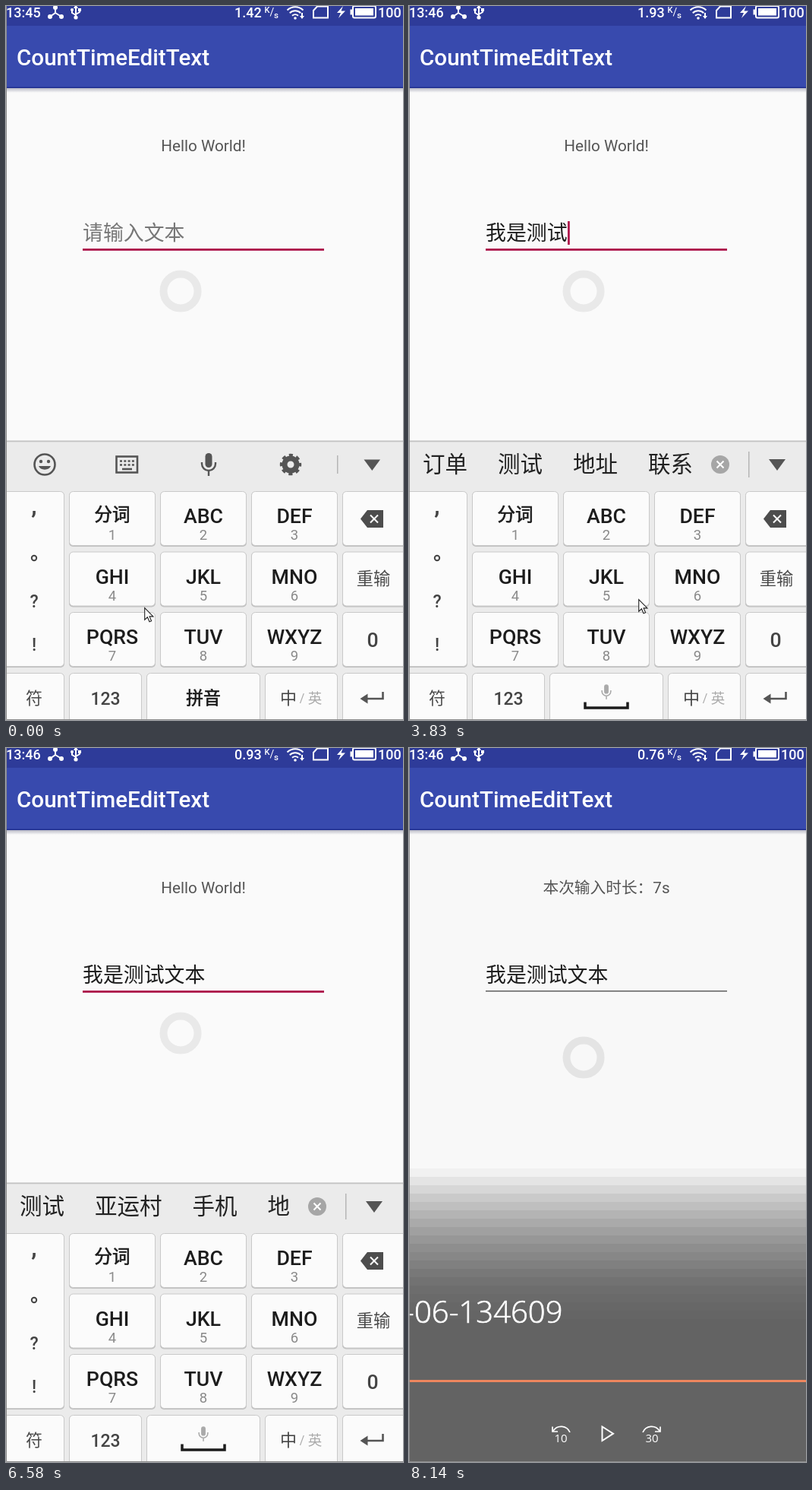
Write an HTML page that moves like this. It is 523x939 px and loops after 8.24 s.

```html
<!DOCTYPE html>
<html lang="zh-CN">
<head>
<meta charset="utf-8">
<title>CountTimeEditText</title>
<style>
html, body { margin: 0; width: 100%; height: 100%; overflow: hidden; background: #fafafa; }
svg { display: block; width: 523px; height: 939px; font-family: Roboto, "Noto Sans CJK SC", sans-serif; }
text { white-space: pre; }
.key { fill: #fbfbfb; stroke: #c9c9c9; stroke-width: 1; }
.shade { fill: #c0c0c0; }
.line { fill: none; stroke: #fff; stroke-width: 2; }
.ink { fill: #555; }
.inkline { fill: none; stroke: #555; stroke-width: 2.6; }
.thick { stroke: currentColor; stroke-width: .7; }
.player { font-family: "Open Sans", sans-serif; fill: #fff; }
</style>
</head>
<body>
<svg viewBox="0 0 523 939" xmlns="http://www.w3.org/2000/svg">
  <defs>
    <linearGradient id="drop" x2="0" y2="1">
      <stop stop-color="#b9bac6"/><stop offset="1" stop-color="#fafafa"/>
    </linearGradient>
    <clipPath id="clip"><rect id="clipBox" y="573" width="374" height="62"/></clipPath>
    <g id="mic">
      <rect x="-4.5" y="-15" width="9" height="19" rx="4.5"/>
      <path d="M-9 -3v2a9 9 0 0 0 18 0v-2M0 8v7" fill="none" stroke="currentColor" stroke-width="2.4"/>
    </g>
  </defs>
  <rect id="page" width="523" height="939" fill="#fafafa"/>

  <g id="app">
    <rect y="108" width="523" height="6" fill="url(#drop)"/>
    <rect width="523" height="26" fill="#2e3b99"/>
    <rect y="26" width="523" height="82" fill="#384aae"/>
    <rect y="106.500" width="523" height="1.500" fill="#1f2f8f"/>
  </g>

  <g id="status" fill="#fff">
    <path class="line" d="M65 2v7l-7 5M65 9l8 5"/>
    <circle cx="65" cy="2" r="3"/><circle cx="58" cy="14" r="3"/><circle cx="73" cy="14" r="3"/>
    <path class="line" d="M92 1v14M87 5v4l5 3M97 4v4l-5 3" stroke-width="1.7"/>
    <path d="M92 -2l3 5h-6z"/><circle cx="92" cy="15" r="2.6"/><circle cx="87" cy="5" r="2"/><rect x="95" y="3" width="4" height="4"/>
    <path class="line" d="M370.500 5.500a15 15 0 0 1 21 0M373.800 9.200a10.300 10.300 0 0 1 14.400 0M377 12.700a6 6 0 0 1 8 0"/>
    <circle cx="381" cy="16" r="1.8"/>
    <path id="arrow"/>
    <path class="line" d="M405 15.500V6l5 -5.500H424V15.500z" stroke-width="2.2"/>
    <path d="M444 0l-8 9h5l-3 7l9 -9.500h-5.500z"/>
    <rect class="line" x="457" y="0" width="30" height="15.500" rx="2"/>
    <rect x="460" y="3" width="24" height="9.500"/><rect x="453.500" y="4.500" width="3" height="7"/>
  </g>

  <g id="edit">
    <rect id="rule" x="101" y="319" width="318"/>
    <rect id="caret" y="283" width="2.800" height="31" fill="#b0104c"/>
    <circle id="ring" cx="230" r="22.500" fill="none" stroke="#e8e8e8" stroke-width="10"/>
  </g>

  <g id="board">
    <g id="tab">
      <path id="tabBox" fill="#fafafa" stroke="#b9b9b9"/>
      <text id="pin" x="5" y="566" font-size="22.500" fill="#222"></text>
    </g>
    <rect y="572" width="523" height="367" fill="#ebebeb"/>
    <rect y="571.500" width="523" height="1.800" fill="#c2c2c2"/>
    <g id="tools">
      <circle class="inkline" cx="51" cy="603" r="13.500"/>
      <g class="ink">
        <circle cx="46" cy="599" r="2.200"/><circle cx="56" cy="599" r="2.200"/>
        <path d="M43 605h16a8.500 7 0 0 1 -16 0z"/>
        <use href="#mic" x="267" y="603" color="#555"/>
        <path d="M471.500 596.500h21.500l-10.700 14.500z"/>
      </g>
      <rect class="inkline" x="145.500" y="592.500" width="27.500" height="21"/>
      <path class="inkline" d="M150 598.500h19M150 603.500h19" stroke-dasharray="3 2.300"/>
      <path class="inkline" d="M153 609h13"/>
      <circle cx="375" cy="603" r="8" fill="none" stroke="#555" stroke-width="7"/>
      <circle cx="375" cy="603" r="12.200" fill="none" stroke="#555" stroke-width="4" stroke-dasharray="5 4.580" stroke-dashoffset="2.500"/>
      <rect x="436" y="591" width="1.500" height="24" fill="#b5b5b5"/>
    </g>
    <g id="words" text-anchor="middle" clip-path="url(#clip)"></g>
    <rect id="split" x="447" y="586" width="1.500" height="34" fill="#b5b5b5"/>
    <g id="close">
      <circle cx="410" cy="603" r="12" fill="#a6a6a6"/>
      <path class="line" d="M405.500 598.500l9 9M414.500 598.500l-9 9"/>
      <path class="ink" d="M474 596h22l-11 15z"/>
    </g>
    <path id="more" d="M477 593l10 10.500l-10 10.500M488 593l10 10.500l-10 10.500" fill="none" stroke="#222" stroke-width="2.600"/>
    <g id="keys"></g>
    <g id="side"></g>
    <g id="marks">
      <circle cx="37" cy="726" r="3.200" fill="none" stroke="#444" stroke-width="2"/>
    </g>
    <path d="M467 674.500l9 -11.500h21v23h-21z" fill="#4d4d4d"/>
    <path class="line" d="M480 669.500l10 10M490 669.500l-10 10" stroke-width="2.800"/>
    <path d="M496.500 902v9H474" class="inkline"/><path class="ink" d="M466.500 911l10 -6.500v13z"/>
    <g id="space">
      <g fill="#aaa" color="#aaa" transform="translate(260 902) scale(.65)"><use href="#mic"/></g>
      <path d="M232 915.500v7.500h56v-7.500" fill="none" stroke="#1c1c1c" stroke-width="3.500"/>
    </g>
  </g>

  <path id="mouse" d="M.7 .7v15.500l3.700 -3.400l2.600 6l2.600 -1.100l-2.500 -5.800h4.800z" fill="#fff" stroke="#222" stroke-width="1.100"/>

  <g id="veil">
    <g id="bands"></g>
    <rect y="831" width="523" height="3" fill="#ee865e"/>
    <g class="line">
      <path d="M254.500 892.500v18.500l14.500 -9.300z"/>
      <path id="skip" d="M190 898a12.500 12.500 0 0 1 22 2M189 892.500v6.500h7" stroke-width="1.700"/>
      <use href="#skip" transform="matrix(-1 0 0 1 520 0)"/>
    </g>
    <g class="player" text-anchor="middle">
      <text class="thick" x="202.500" y="756" font-size="40" font-weight="300" text-anchor="end" color="#fff">-06-134609</text>
      <text x="200" y="913" font-size="15">10</text>
      <text x="320" y="913" font-size="15">30</text>
    </g>
  </g>
  <path d="M.5 0V938.500H523" fill="none" stroke="#8c8c8c"/>
</svg>

<script>
const $ = id => document.getElementById(id);
const add = (id, markup) => $(id).insertAdjacentHTML('beforeend', markup);
const label = (s, x, y, size, fill, opt = '') =>
  `<text x="${x}" y="${y}" font-size="${size}" fill="${fill}" color="${fill}" ${opt}>${s}</text>`;
const mid = 'text-anchor="middle"';
const medium = 'font-weight="500"';
const bold = `${mid} ${medium}`;
const thick = `${mid} class="thick"`;
const show = (id, on) => { $(id).style.display = on ? '' : 'none'; };

// Fixed labels
add('app', label('CountTimeEditText', 14, 78, 29.6, '#fff', medium) +
  label('', 260, 190.7, 20.7, '#555', mid + ' id="note"'));
add('status', label('', 0, 14.6, 18, '#fff', medium + ' id="clock"') +
  label('', 301, 14.6, 18, '#fff', medium + ' id="speed"') +
  label('K', 340.5, 8.5, 11, '#fff', medium) + label('/', 347.5, 13, 14, '#fff') +
  label('s', 353, 16, 11.5, '#fff', medium) + label('100', 490, 14.6, 18, '#fff', medium));
add('edit', label('', 101, 308, 26.9, '#222', 'id="field"'));

// Keyboard
function key(x, y, w, h, id) {
  add('keys', `<rect class="shade" x="${x}" y="${y + 1}" width="${w}" height="${h}" rx="5"/>` +
    `<rect class="key" id="key${id}" x="${x + .5}" y="${y + .5}" width="${w - 1}" height="${h - 1}" rx="5"/>`);
}
key(-10, 638, 87, 231, 'Side');
'分词 ABC DEF GHI JKL MNO PQRS TUV WXYZ'.split(' ').forEach((name, i) => {
  const x = 83 + i % 3 * 120, y = 638 + Math.floor(i / 3) * 79.5;
  key(x, y, 114, 72, i + 1);
  add('keys', label(name, x + 57, y + (i ? 42 : 39), i ? 26.7 : 23.5, '#1c1c1c', i ? bold : thick) +
    label(i + 1, x + 57, y + 64.3, 18.5, '#8a8a8a', mid));
});
for (let r = 0; r < 3; r++) key(443, 638 + r * 79.5, 92, 72, 'R' + r);
[[-10, 87], [83, 96], [185, 150], [341, 96], [443, 92]].forEach(([x, w], i) => key(x, 877, w, 74, 'B' + i));
add('keys', label('重输', 484, 761, 22.3, '#4a4a4a', mid) + label('0', 483, 842.5, 26.7, '#444', bold) +
  label('符', 37, 918, 22, '#4a4a4a', mid) + label('123', 131, 919, 23, '#444', bold) +
  label('拼音', 260, 918, 22.8, '#1c1c1c', thick + ' id="spaceName"') +
  label('中', 372, 918, 22, '#444', mid) + label('/', 390, 916, 16, '#aaa', mid) +
  label('英', 407, 917, 18.5, '#aaa', mid));
add('marks', label(',', 37, 668, 30, '#444', mid + ' font-weight="700"') + label('?', 37, 791, 23, '#444', bold) +
  label('!', 37, 848, 23, '#444', bold));

// Player shade: stepped gradient, then flat
const bandCount = 19, bandH = 11, dark = .6;
for (let i = 0; i <= bandCount; i++) {
  const last = i === bandCount;
  const a = last ? dark : dark * (1 - Math.pow(1 - (i + .5) / bandCount, 1.8));
  add('bands', `<rect y="${553 + i * bandH}" width="523" height="${last ? 400 : bandH}" opacity="${a}" shape-rendering="crispEdges"/>`);
}

// Each step overrides part of the state from its time on
const LOOP = 8240;
const start = { clock: '13:45', speed: '1.42', text: '', caret: 0, pin: '', words: '', opts: '',
  mouse: [182, 791], mic: 0, press: '', slide: 0, done: 0, veil: 0, up: 0 };
const firstKey = { pin: 'w', opts: 'w x y z', words: '我 在 想 要 有 这' };
const steps = [
  [0, {}],
  [120, { caret: 1, press: 9, mouse: null }],
  [250, { ...firstKey, mic: 1, press: '' }],
  [380, { press: 6 }],
  [510, { press: '', pin: 'wo', opts: 'wo yo w y', words: '我 握 窝 卧 沃 喔' }],
  [790, { press: 7 }],
  [920, { press: '', pin: "wo's", words: '我说 我是 我 握 窝' }],
  [1050, { press: 4, pin: "wo'sh", words: '我是 我说 我 握 窝' }],
  [1180, { press: '' }],
  [1300, { press: 4, pin: "wo'shi", words: '我是 我市 我 握 窝' }],
  [1430, { press: '', mouse: [310, 785] }],
  [1560, { pin: '', text: '我是', words: '说 你 歌手 真的 请问', up: 1 }],
  [1930, { mouse: null }],
  [2200, { press: 2, up: 0 }],
  [2330, { press: '', pin: 'c', opts: 'a b c', words: '才 不 把 被 从 吧' }],
  [2460, { press: 3, pin: 'ce', opts: 'be ce a b', words: '测 册 侧 策 厕 恻' }],
  [2590, { press: '' }],
  [2730, { press: 7, pin: "ce's", words: '测试 测算 测 册 侧', clock: '13:46', speed: '1.93' }],
  [2860, { press: 4, pin: "ce'sh" }],
  [3000, { pin: "ce'shi", words: '测试 侧室 测 册 侧' }],
  [3130, { press: '' }],
  [3560, { mouse: [302, 780] }],
  [3690, { pin: '', text: '我是测试', words: '订单 测试 地址 联系' }],
  [4070, { mouse: null }],
  [4340, { ...firstKey, speed: '0.93' }],
  [4470, { press: 3, pin: 'ye', opts: 'ye ze w x', words: '也 则 夜 业 叶 页' }],
  [4600, { press: 6, pin: 'wen', opts: 'wen zen ye ze', words: '问 文 怎 稳 温 吻' }],
  [4730, { press: '' }],
  [5100, { press: 2, pin: "wen'b", words: '文本 问 文 怎 稳', up: 1 }],
  [5240, { press: 3, pin: "wen'be" }],
  [5380, { press: 6, pin: "wen'ben", words: '文本 问本 问 文 怎' }],
  [5520, { press: '', up: 0 }],
  [6050, { pin: '', text: '我是测试文本', words: '测试 亚运村 手机 地址' }],
  [6580, { caret: 0 }],
  [6870, { speed: '0.76' }],
  [7010, { slide: 130 }],
  [7150, { slide: 400, done: 1 }],
  [7870, { veil: .35 }],
  [8000, { veil: .75 }],
  [8140, { veil: 1 }]
];

function drawWords(s) {
  const typing = !!s.pin;
  $('clipBox').setAttribute('width', typing ? 447 : 374);
  let x = -2;
  $('words').innerHTML = s.words.split(' ').map((word, i) => {
    const w = Math.max(75, word.length * 29.5 + 40), cx = x + w / 2;
    x += w;
    return label(word, cx, 613.3, 29.5, typing && !i ? '#1261a8' : '#222');
  }).join('');
}

function draw(s) {
  const typing = !!s.pin, listed = !!s.words;
  $('clock').textContent = s.clock;
  $('speed').textContent = s.speed;
  $('arrow').setAttribute('d', s.up ? 'M390 9l3 4h-2v4h-2v-4h-2z' : 'M390 17l3 -4h-2v-4h-2v4h-2z');
  $('note').textContent = s.done ? '本次输入时长：7s' : 'Hello World!';
  $('page').setAttribute('fill', s.done ? '#f8f8f8' : '#fafafa');
  $('field').textContent = s.text || '请输入文本';
  $('field').setAttribute('fill', s.text ? '#1c1c1c' : '#777');
  $('rule').setAttribute('height', s.done ? 1.4 : 2.8);
  $('rule').setAttribute('fill', s.done ? '#555' : '#ac0f4a');
  $('caret').setAttribute('x', 101 + 27 * s.text.length);
  $('ring').setAttribute('cy', s.done ? 407 : 375);
  $('ring').setAttribute('stroke', s.done ? '#e4e4e4' : '#e9e9e9');
  show('caret', s.caret);

  $('board').setAttribute('transform', `translate(0 ${s.slide})`);
  show('board', !s.done);
  show('tools', !listed);
  show('split', listed);
  show('close', listed && !typing);
  show('more', typing);
  show('tab', typing);
  show('marks', !typing);
  show('space', s.mic);
  show('spaceName', !s.mic);
  drawWords(s);
  $('side').innerHTML = typing
    ? s.opts.split(' ').map((o, i) => label(o, 37, 676.5 + i * 57, 24, '#555', mid)).join('') : '';
  $('pin').textContent = s.pin;
  if (typing) {
    const w = $('pin').getComputedTextLength() + 20;
    $('tabBox').setAttribute('d', `M0 542.500H${w - 6}q6 0 6 6V573H0z`);
  }
  for (let n = 1; n <= 9; n++) $('key' + n).style.fill = s.press === n ? '#dcdcdc' : '';

  show('mouse', s.mouse);
  if (s.mouse) $('mouse').setAttribute('transform', `translate(${s.mouse})`);
  $('veil').setAttribute('opacity', s.veil);
}

const began = performance.now();
let current = -1;
function tick(now) {
  const t = Math.max(0, now - began) % LOOP;
  const index = steps.filter(([at]) => at <= t).length - 1;
  if (index !== current) {
    current = index;
    draw(Object.assign({}, start, ...steps.slice(0, index + 1).map(step => step[1])));
  }
  requestAnimationFrame(tick);
}
tick(began);
</script>
</body>
</html>
```
